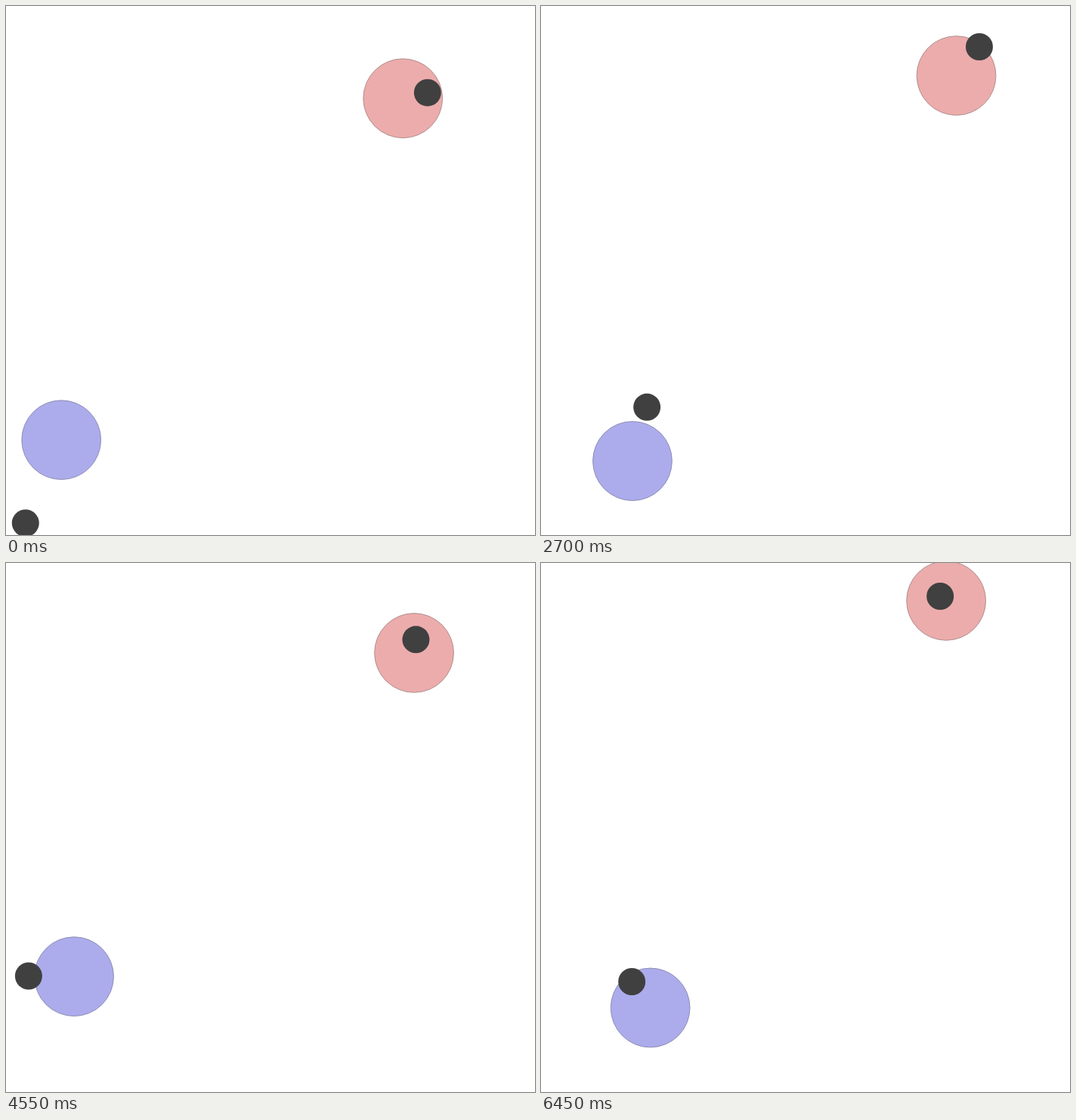
Animation, 700 px wide and 700 px high, one loop 6500 ms. Source, as an HTML page with a canvas:

```html
<!DOCTYPE html>
<html>
<head>
<meta charset="utf-8">
<style>
html, body { margin: 0; width: 100%; height: 100%; overflow: hidden; background: #fff; }
canvas { display: block; }
</style>
</head>
<body>
<canvas id="stage" width="700" height="700"></canvas>
<script>
const ctx = document.getElementById('stage').getContext('2d');
const SCENE = 1300, STEP = 50;

// each triple of points: dot, where the circle starts, where it settles
const red = [
  [[557.8, 114.7], [525.2, 122.2], [577, 122.2]],
  [[530, 57.8], [599.5, 54.5], [530.4, 77.7]],
  [[580, 54], [519.8, 110.8], [575, 76.2]],
  [[542.4, 101.3], [540, 162], [540, 114.5]],
  [[528.2, 44], [648, 46], [536.3, 49.9]]
];
const blue = [
  [[25.8, 684.2], [73.2, 574.2], [69.8, 726.8]],
  [[36.1, 546.5], [72, 600], [69.6, 581.6]],
  [[140.2, 530.8], [87, 644], [150, 566.3]],
  [[29.9, 546.5], [152.2, 542.2], [83.6, 547.7]],
  [[120.2, 554], [170, 607], [144.7, 588.5]]
];

// damped spring: 1 at the start, overshoots, dies away
const swing = t => Math.exp(-t / 300) * Math.cos(Math.PI * t / 360);

function disc([x, y], r, fill, stroke) {
  ctx.beginPath();
  ctx.arc(x, y, r, 0, 2 * Math.PI);
  ctx.fillStyle = fill;
  ctx.fill();
  if (!stroke) return;
  ctx.strokeStyle = stroke;
  ctx.lineWidth = 0.8;
  ctx.stroke();
}

function drawPair([dot, from, rest], t, fill, stroke) {
  const centre = rest.map((v, i) => v + (from[i] - v) * swing(t));
  disc(centre, 52.4, fill, stroke);
  disc(dot, 18, '#404040');
}

function draw(now) {
  const t = Math.floor(now / STEP) * STEP;
  const scene = Math.floor(t / SCENE) % red.length;
  ctx.clearRect(0, 0, 700, 700);
  drawPair(red[scene], t % SCENE, '#ecacac', '#a08080');
  drawPair(blue[scene], t % SCENE, '#acacec', '#8080a8');
}

const start = performance.now();
function frame() {
  draw(performance.now() - start);
  requestAnimationFrame(frame);
}
frame();
</script>
</body>
</html>
```
